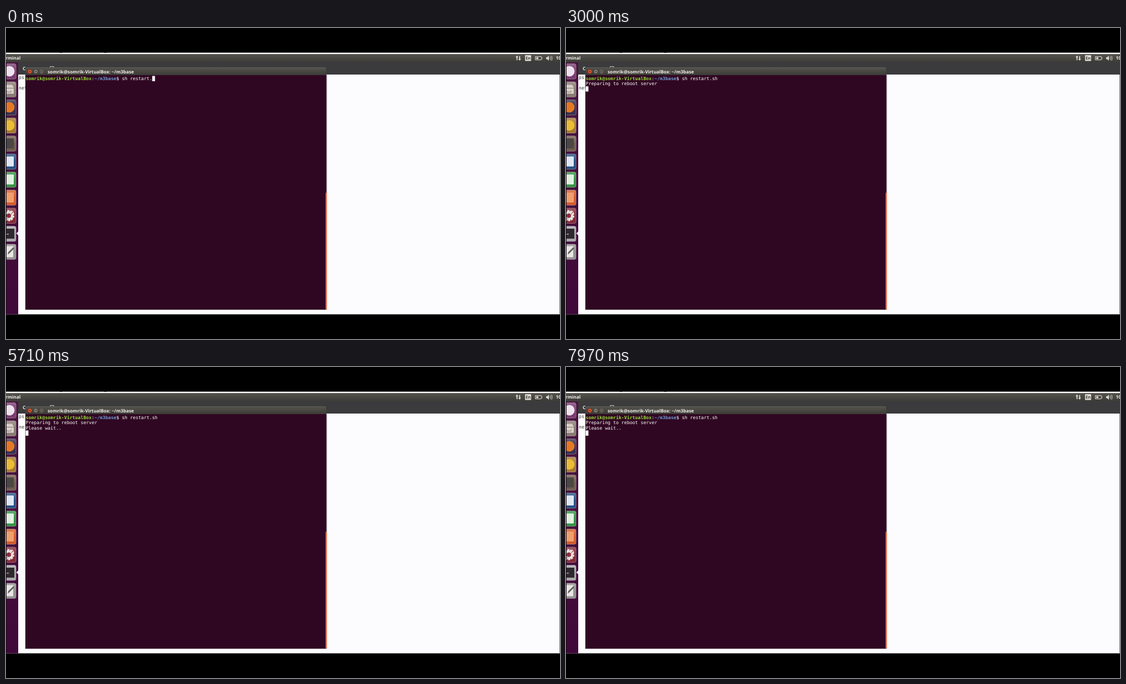
An HTML page for the animation above (8 s loop, 998 by 561 pixels).

```html
<!DOCTYPE html>
<html lang="en">
<head>
<meta charset="utf-8">
<title>Terminal restart</title>
<style>
  html, body { margin: 0; width: 100%; height: 100%; overflow: hidden; background: #000; }
  svg { display: block; width: 100vw; height: 100vh; }
  text { text-rendering: geometricPrecision; white-space: pre; }
  .ui { font: 600 8.25px "Noto Sans", sans-serif; fill: #f3f1ec; }
  .mono { font: 8.234px "DejaVu Sans Mono", monospace; fill: #fff; }
  .user { font-weight: bold; fill: #93dc35; }
  .path { font-weight: bold; fill: #6f9bd2; }
  .page { fill: #3a3a3c; }

  .timed { animation: 8s step-end infinite; }
  #key1 { animation-name: key1; }
  #key2 { animation-name: key2; }
  #out1 { animation-name: out1; }
  #out2 { animation-name: out2; }
  #edge { animation-name: edge; }
  #cursor { animation-name: move, blink; }

  @keyframes key1 { 0% { opacity: 0 } 1.5%, 100% { opacity: 1 } }
  @keyframes key2 { 0% { opacity: 0 } 3.25%, 100% { opacity: 1 } }
  @keyframes out1 { 0% { opacity: 0 } 21.875%, 100% { opacity: 1 } }
  @keyframes out2 { 0% { opacity: 0 } 59.625%, 100% { opacity: 1 } }
  @keyframes edge { 0% { opacity: 1 } 59.625%, 100% { opacity: 0 } }
  @keyframes move {
    0% { transform: translate(228px, 0) }
    1.5% { transform: translate(233px, 0) }
    3.25% { transform: translate(238px, 0) }
    21.875% { transform: translate(0, 18.6px) }
    59.625%, 100% { transform: translate(0, 27.9px) }
  }
  /* 600 ms on, 600 ms off, restarted by each key press */
  @keyframes blink {
    0%, 18.25%, 36.875%, 51.875%, 66.875%, 81.875%, 96.875%, 100% { opacity: 1 }
    10.75%, 29.375%, 44.375%, 59.375%, 74.375%, 89.375% { opacity: 0 }
  }
</style>
</head>
<body>
<svg viewBox="0 0 998 561" preserveAspectRatio="none">
  <defs>
    <linearGradient id="bar" x2="0" y2="1">
      <stop stop-color="#55534d"/><stop offset="1" stop-color="#3c3b37"/>
    </linearGradient>
    <linearGradient id="dock" x2="0" y2="1">
      <stop stop-color="#4a1440"/><stop offset="1" stop-color="#3e0838"/>
    </linearGradient>
    <linearGradient id="gloss" x2="0" y2="1">
      <stop stop-color="#fff" stop-opacity=".22"/><stop offset="1" stop-color="#fff" stop-opacity="0"/>
    </linearGradient>
  </defs>

  <rect width="998" height="561"/>

  <!-- desktop -->
  <rect y="44.500" width="998" height="472" fill="#fcfbfd"/>
  <path d="M97 44.500h4M177 44.500h4" stroke="#333"/>
  <rect y="47" width="998" height="15" fill="url(#bar)"/>
  <rect x="22" y="62" width="976" height="22" fill="#3b3b3d"/>
  <text class="ui" x="-1" y="57">rminal</text>
  <path d="M997.500 84V516" stroke="#77747a"/>

  <!-- indicators -->
  <g fill="#dedbd3">
    <path d="M918 53l2.500-3.500 2.500 3.500h-1.600v5h-1.800v-5zM922.800 55.500h1.600v-5h1.800v5h1.600l-2.500 3.500z"/>
    <rect x="935" y="49" width="11" height="10.500" rx="1"/>
    <path d="M953.500 51.500h10.500v1.500h1.500v3h-1.500v1.500h-10.500z" fill="none" stroke="#dedbd3"/>
    <rect x="955" y="53" width="4" height="3"/>
    <path d="M973 52.700h2l3-2.700v9l-3-2.700h-2z"/>
    <path d="M979.500 52.500q1.500 2 0 4M981 51q2.700 3.500 0 7M982.500 50q3.500 4.500 0 9" fill="none" stroke="#dedbd3" stroke-width=".8"/>
  </g>
  <text class="ui" x="936" y="57" style="font-size:7.5px;fill:#3c3b37">En</text>
  <text class="ui" x="990.500" y="57">10</text>

  <!-- page behind the terminal -->
  <text class="ui" x="30" y="76">C</text>
  <path d="M79.500 72v-2.500h6.500v2.500" fill="none" stroke="#ccc"/>
  <text class="mono page" x="23" y="92">ps</text>
  <text class="mono page" x="23" y="110.500">ne<tspan id="edge" class="timed">t</tspan></text>

  <!-- launcher -->
  <rect y="62" width="22" height="454.500" fill="url(#dock)"/>
  <g id="icons"></g>
  <path d="M22 367v7l-3.500-3.500z" fill="#eee"/>
  <path d="M.5 62V516" stroke="#1c0619"/>

  <!-- terminal window -->
  <rect x="34" y="84" width="544.500" height="425" fill="#000" opacity=".18"/>
  <path d="M35 85V74q0-3 3-3H574q3 0 3 3V85z" fill="url(#bar)"/>
  <path d="M37 71.500H575" stroke="#66645d" stroke-width=".7"/>
  <rect x="35" y="85" width="542" height="423" fill="#300722"/>
  <path d="M577.300 85V297" stroke="#77717a"/>
  <rect x="575.700" y="297" width="2.300" height="211" rx="1" fill="#e0714b"/>
  <g stroke="#2f2e2a" stroke-width=".8">
    <circle cx="43" cy="78.500" r="4" fill="#e8552f"/>
    <circle cx="53.600" cy="78.500" r="4" fill="#807e76"/>
    <circle cx="64.200" cy="78.500" r="4" fill="#807e76"/>
  </g>
  <path d="M41.500 77l3 3m0-3l-3 3M51.700 78.500h3.800M62.500 77h3.400v3h-3.400z" fill="none" stroke="#3a2a24" stroke-width=".9"/>
  <text class="ui" x="75" y="81.600">somrik@somrik-VirtualBox: ~/m3base</text>

  <g class="mono">
    <text x="35.500" y="94"><tspan class="user">somrik@somrik-VirtualBox</tspan>:<tspan class="path">~/m3base</tspan>$ sh restart.<tspan id="key1" class="timed">s</tspan><tspan id="key2" class="timed">h</tspan></text>
    <text id="out1" class="timed" x="35.500" y="103.400">Preparing to reboot server</text>
    <text id="out2" class="timed" x="35.500" y="112.700">Please wait..</text>
  </g>
  <rect id="cursor" class="timed" x="35.400" y="86.500" width="5" height="9.500" fill="#fff"/>
</svg>

<script>
  const circle = color => `<circle cx="6" cy="14" r="9.5" fill="${color}"/>`;
  const square = color => `<rect x="-4" y="5" width="18" height="18" rx="1" fill="${color}"/>`;
  const shape = (d, fill, stroke = "none") => `<path d="${d}" fill="${fill}" stroke="${stroke}"/>`;

  // Tile colour and its picture, from top to bottom
  const icons = [
    ["#793b72", circle("#eee3ec")],
    ["#8b7c74", shape("M-4 6H11L14 11V22H-4z", "#d8d2c9") + shape("M-4 12H14M1 16V19H9V16", "none", "#81766e")],
    ["#363253", circle("#e47925")],
    ["#a47b36", circle("#e9bd35")],
    ["#715c4c", square("#4a4744")],
    ["#245184", square("#dfe9f2")],
    ["#329443", square("#e2f0e1")],
    ["#d45b2b", square("#efa06e")],
    ["#852a37",
      `<circle cx="5" cy="14" r="8" fill="none" stroke="#f1eeec" stroke-width="4" stroke-dasharray="3.6 1.4"/>
       <circle cx="5" cy="14" r="6" fill="none" stroke="#e5e1df" stroke-width="4"/>` +
      shape("M1 21L12 8", "none", "#b8423f") + shape("M11 5l3 4", "none", "#f4f2f0")],
    ["#aaa7ac", shape("M-5 5H15V23H-5z", "#2d2a2d") + shape("M0 15H5", "none", "#eee")],
    ["#929092", shape("M-5 4H13V24H-5z", "#e8e7e3") + shape("M3 19l1-4 9-9 2 2-9 9z", "#625f5b")],
  ];

  document.getElementById("icons").innerHTML = icons.map(([tile, picture], i) => `
    <g transform="translate(0 ${64 + i * 32.55})">
      <rect x="-9.500" y=".5" width="27.500" height="27.500" rx="3" fill="${tile}" stroke="#c0adb9" stroke-opacity=".55"/>
      <rect x="-9" y="1" width="26.500" height="13" rx="3" fill="url(#gloss)"/>
      ${picture}
    </g>`).join("");
</script>
</body>
</html>
```
